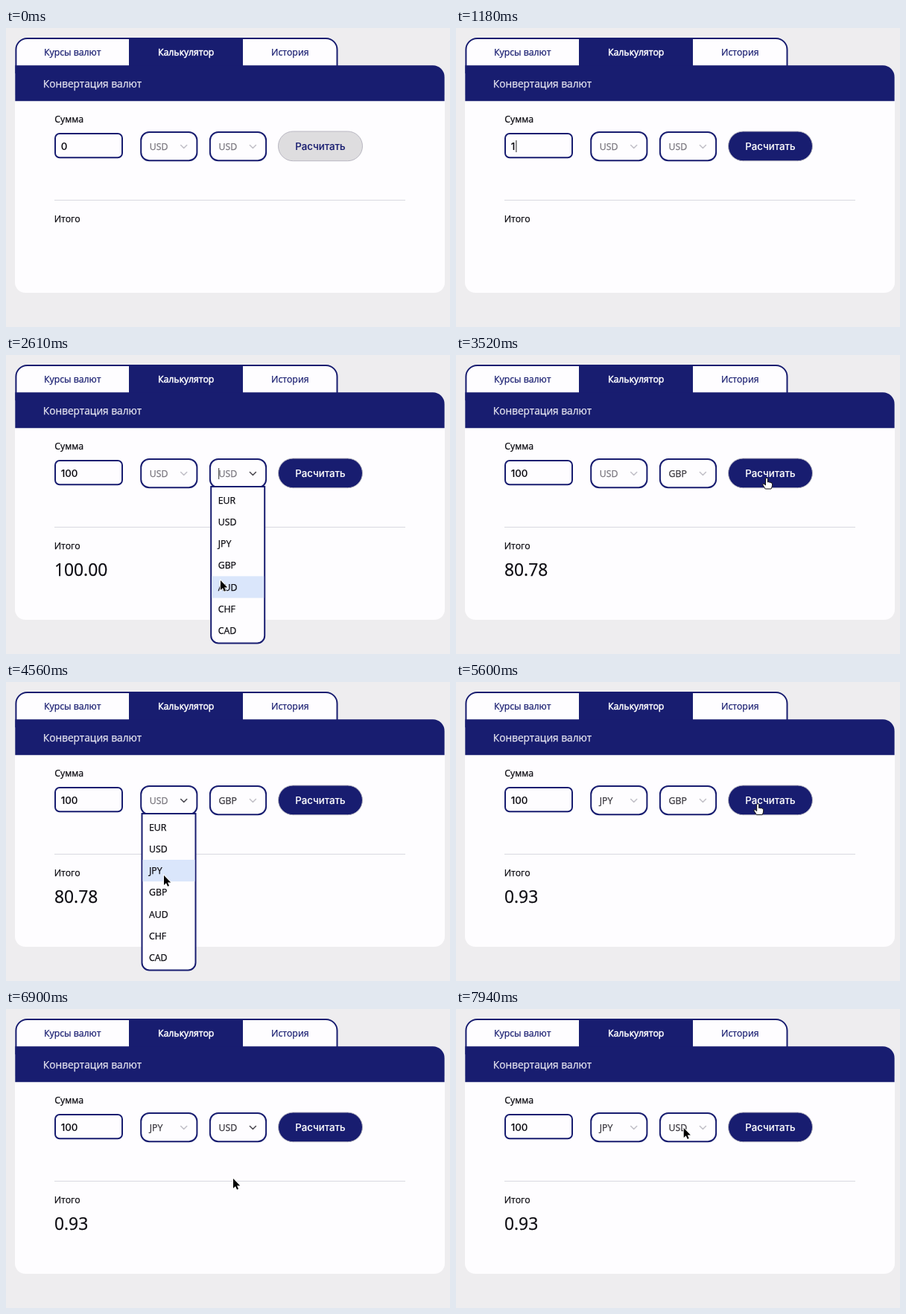
An HTML page for the animation above (8000 ms loop, 596 px wide and 402 px high).

```html
<!DOCTYPE html>
<html lang="ru">
<head>
<meta charset="utf-8">
<title>Конвертация валют</title>
<style>
  html, body { margin: 0; width: 100%; height: 100%; overflow: hidden; background: #eeedef; }
  svg { display: block; width: 596px; height: 402px; }
  text {
    font: 12.3px "Open Sans", "Noto Sans", sans-serif; white-space: pre;
    color: #0b0a10; fill: currentColor; stroke: currentColor; stroke-width: .25;
  }
  .navy { fill: #181d70; }
  .box { fill: #fefdff; stroke: #181d70; stroke-width: 2; }
  .tab { color: #181d70; text-anchor: middle; }
  .on { color: #fff; stroke-width: .5; }
  .title { font-size: 13.7px; color: #e6e5f0; }
  .total { font-size: 22.8px; }
  .ui { font: 500 13.3px Inter, Roboto, sans-serif; stroke-width: .1; }
  .chev { fill: none; stroke-width: 1.6; stroke-linecap: round; stroke-linejoin: round; }
</style>
</head>
<body>
<svg viewBox="0 0 596 402">
  <rect width="596" height="402" fill="#eeedef"/>
  <path fill="#fefdff" d="M12 90H589V342a14 14 0 0 1-14 14H26a14 14 0 0 1-14-14Z"/>
  <path class="box" d="M13.4 60V29a15 15 0 0 1 15-15H429.500a15 15 0 0 1 15 15V60Z"/>
  <rect class="navy" x="165" y="13" width="153" height="40"/>
  <path class="navy" d="M12.300 50.300H573a15.600 15.600 0 0 1 15.600 15.600V98.200H12.300Z"/>
  <text class="tab" x="89.200" y="37">Курсы валют</text>
  <text class="tab on" x="241.700" y="37">Калькулятор</text>
  <text class="tab" x="381.300" y="37">История</text>
  <text class="title" x="49.800" y="79.500">Конвертация валют</text>
  <text x="65.200" y="127">Сумма</text>
  <rect class="box" x="66" y="142" width="90" height="32.300" rx="6"/>
  <text class="ui" id="amount" x="73.700" y="164"></text>
  <rect id="caret" y="151" width="1" height="16" fill="#222"/>
  <rect id="button" x="365.500" y="139" width="113" height="39.700" rx="19.850" stroke="#b9b7c2"/>
  <text class="ui" id="label" x="422" y="164" text-anchor="middle">Расчитать</text>
  <path d="M65 231.500H536" stroke="#d9d9e0"/>
  <text x="64.700" y="260.500">Итого</text>
  <text class="total" id="total" x="65" y="296.700"></text>
  <g id="selects"></g>
  <path id="arrow" d="M0 1V14L3 11.300 5 15.800 7 15 5 10.500H9.200Z" stroke="#fff" stroke-width="1.600" paint-order="stroke"/>
  <path id="hand" d="M-1.500 1Q0-.7 1.500 1V6Q3 4.900 3.800 6.300 5.300 5.500 6 7 7.500 6.500 7.500 8.300V10.500Q7.300 12.500 6 15H-1.800L-5 10Q-5.800 8.300-4.300 8.100-3 8.300-1.500 10Z" fill="#fff" stroke="#111" stroke-linejoin="round"/>
</svg>
<script>
const LOOP = 8000, STEP = 130, TYPE = 1050, TRAVEL = 390;
const CODES = ['EUR', 'USD', 'JPY', 'GBP', 'AUD', 'CHF', 'CAD'];
const LEFT = [180, 272.7], ROW_TOP = 180.6, ROW = 29.2;
const BUTTON = [417, 165], PICK = LEFT.map(x => [x + 33, 159]);
const $ = id => document.getElementById(id);

// arrival time, pointer tip, what the click there changes
const VISITS = [
  [1700, [300, 170], {}],
  [1960, BUTTON, { total: '100.00' }],
  [2350, PICK[1], { open: 1, focus: 1 }],
  [2610, [288, 302], {}],
  [3000, [298, 282], { open: -1, 1: 'GBP' }],
  [3390, BUTTON, { total: '80.78', focus: -1 }],
  [4170, PICK[0], { open: 0, focus: 0 }],
  [4560, [212, 259], {}],
  [4820, [212, 259], { open: -1, 0: 'JPY' }],
  [5210, [440, 165], {}],
  [5340, [440, 165], { total: '0.93', focus: -1 }],
  [5860, PICK[1], { open: 1, focus: 1 }],
  [6380, [309, 253], {}],
  [6510, [305, 227], {}],
  [6770, [305, 227], { open: -1, 1: 'USD' }],
  [7290, BUTTON, {}],
  [7420, BUTTON, { focus: -1 }],
  [7940, PICK[1], {}]
];

const clamp = v => Math.min(1, Math.max(0, v));
const ease = k => k * k * (3 - 2 * k);
const lerp = (a, b, k) => a.map((v, i) => v + (b[i] - v) * k);
const rgb = c => `rgb(${c.map(Math.round)})`;

function stateAt(t) {
  const s = { total: '', open: -1, focus: -1, openedAt: 0 };
  for (const [time, , change] of VISITS) {
    if (time > t) break;
    Object.assign(s, change);
    if (change.open >= 0) s.openedAt = time;
  }
  return s;
}

function pointerAt(t) {
  const i = VISITS.findIndex(v => v[0] > t);
  if (i < 0) return VISITS[VISITS.length - 1][1];
  if (i === 0) return VISITS[0][1];
  const [from, a] = VISITS[i - 1], [to, b] = VISITS[i];
  const span = Math.min(TRAVEL, to - from);
  return lerp(a, b, ease(clamp(1 - (to - t) / span)));
}

function menu(x, value, py) {
  const row = Math.floor((py - ROW_TOP) / ROW);
  const focus = row >= 0 ? row : Math.max(0, CODES.indexOf(value));
  const rows = CODES.map((code, i) => {
    const y = ROW_TOP + i * ROW, chosen = code === value;
    const off = value && !['USD', 'JPY'].includes(code);
    const bg = chosen ? '#217aff' : i === focus && !off ? '#dae6fb' : 'none';
    const ink = chosen ? '#bccbe8' : off ? '#c6c4ca' : '#0b0a10';
    return `<rect x="${x + 3.5}" y="${y}" width="70" height="${ROW}" fill="${bg}"/>
      <text x="${x + 12}" y="${y + 19.1}" style="color:${ink}">${code}</text>`;
  });
  return `<path class="box" d="M${x + 2.5} 177h72V377.500a10 10 0 0 1-10 10h-52a10 10 0 0 1-10-10Z"/>` + rows.join('');
}

function select(x, i, s, t, py) {
  const value = s[i], open = s.open === i;
  const caret = open && (t - s.openedAt + 200) % 1000 < 500;
  return `<rect class="box" x="${x + 1.2}" y="140" width="75.200" height="38.200" rx="11"/>
    <text x="${x + 12.8}" y="163.700" style="color:${value ? '#35333a' : '#77747c'}">${value || 'USD'}</text>
    <path class="chev" stroke="${s.focus === i ? '#4c4a52' : '#c2c0c8'}" d="M${x + 54.7} 157.500l4 4 4-4"/>
    ${caret ? `<rect x="${x + 12.5}" y="152" width="1" height="15" fill="#333"/>` : ''}
    ${open ? menu(x, value, py) : ''}`;
}

function show(id, on, [x, y]) {
  $(id).setAttribute('visibility', on ? 'visible' : 'hidden');
  $(id).setAttribute('transform', `translate(${x} ${y})`);
}

function draw(time) {
  // the picture moves on in even steps
  const t = TYPE + Math.floor((time - TYPE) / STEP) * STEP;
  const s = stateAt(t), tip = pointerAt(t), [px, py] = tip;

  const typed = Math.floor((t - TYPE) / (2 * STEP)) + 1;
  const amount = '100'.slice(0, Math.max(0, typed)) || '0';
  $('amount').textContent = amount;
  $('total').textContent = s.total;
  show('caret', t >= TYPE && t < VISITS[1][0], [80.4 + (amount.length - 1) * 8.3, 0]);

  const live = clamp((t - TYPE + STEP) / (2 * STEP));
  $('button').setAttribute('fill', rgb(lerp([222, 221, 223], [24, 29, 112], live)));
  $('label').style.color = rgb(lerp([24, 29, 112], [255, 255, 255], live));
  $('selects').innerHTML = LEFT.map((x, i) => select(x, i, s, t, py)).join('');

  const shown = t >= VISITS[0][0];
  const over = px > 365 && px < 479 && py > 138 && py < 179;
  show('arrow', shown && !over, tip);
  show('hand', shown && over, tip);
}

const begin = performance.now();
(function tick() {
  draw((performance.now() - begin) % LOOP);
  requestAnimationFrame(tick);
})();
</script>
</body>
</html>
```
